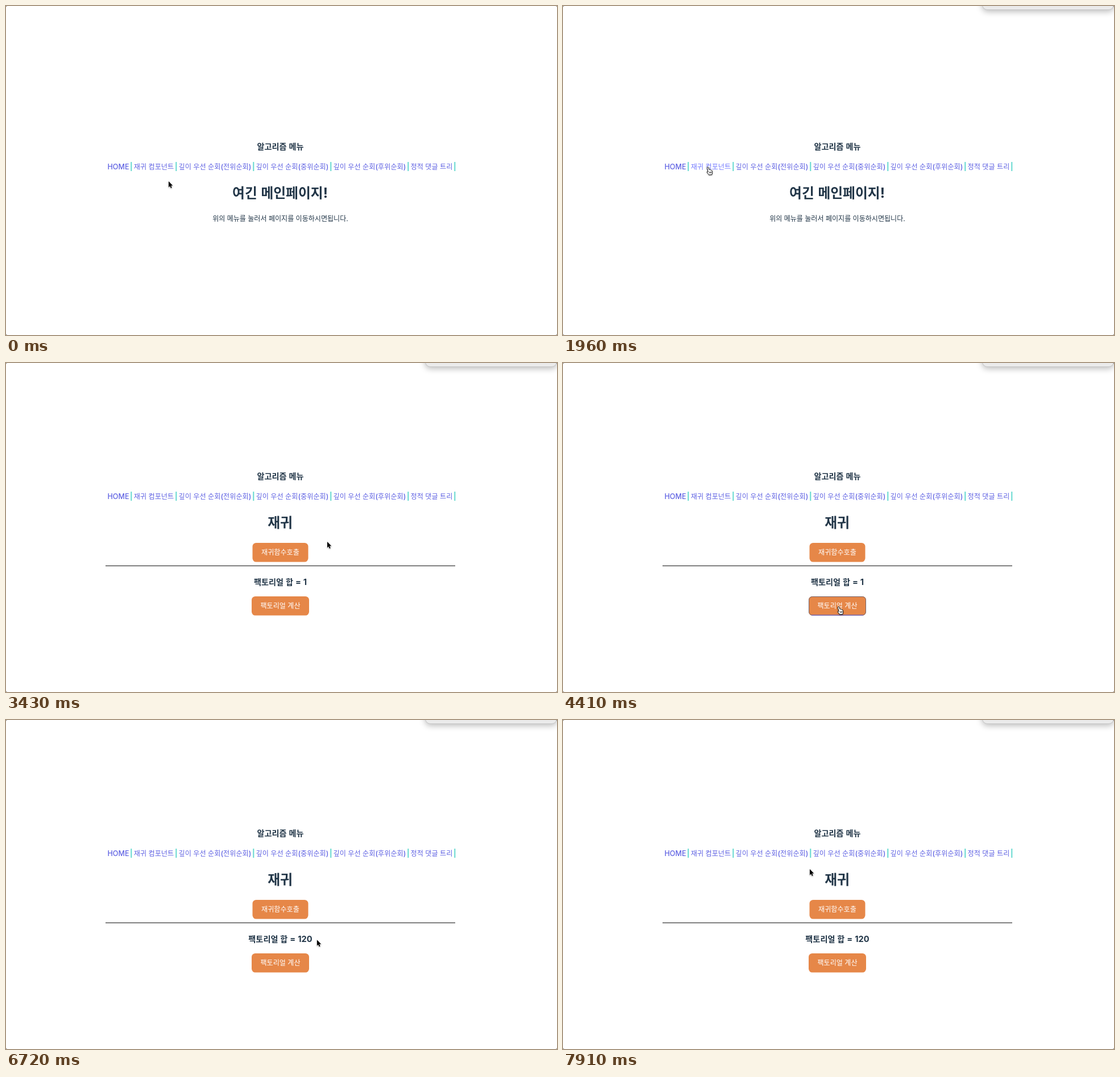
Recreate the animation shown at these times as an HTML page. Size 969 by 578 pixels, loop 8 s.

```html
<!DOCTYPE html>
<html lang="ko">
<head>
<meta charset="utf-8">
<title>알고리즘 메뉴</title>
<style>
  html, body { margin: 0; width: 100%; height: 100%; overflow: hidden; background: #fff; }
  svg { position: absolute; left: 0; top: 0; }
  text { font-family: Inter, 'Noto Sans CJK KR', sans-serif; text-anchor: middle; white-space: pre; }
  .ko { font-family: 'Noto Sans CJK KR', 'Noto Sans CJK JP', sans-serif; }
  #panel {
    position: absolute; left: 737px; top: -60px; width: 232px; height: 67px;
    box-sizing: border-box; background: #ebebeb; border: 1px solid #c6c6c6;
    border-radius: 9px; box-shadow: 0 3px 11px rgba(0, 0, 0, .27);
  }
  #pointer { filter: drop-shadow(0 1px 1px rgba(0, 0, 0, .3)); }
</style>
</head>
<body>
<div id="panel"></div>
<svg width="969" height="578" viewBox="0 0 969 578">
  <clipPath id="swept"><rect id="sweep" y="370" width="200" height="30"/></clipPath>
  <path d="M0 0h2L0 2zM969 0h-2l2 2zM0 578h2l-2-2zM969 578h-2l2-2z" fill="#999"/>
  <g id="header"></g>
  <g id="home"></g>
  <g id="recursion">
    <path d="M175 356.4H790" stroke="#3a3a3a" stroke-width="1.4"/>
    <path id="selection" d="M427 375H538.5V393H512V394.6H427Z" fill="#b2d7fd" clip-path="url(#swept)"/>
    <rect x="433.5" y="316" width="98" height="33.5" rx="6.4" fill="#e68748"/>
    <rect x="432" y="410" width="101" height="33.5" rx="6.4" fill="#e68748"/>
    <g id="ring" fill="none">
      <rect x="432.5" y="410.5" width="100" height="32.5" rx="6" stroke="#75646c"/>
      <path d="M437 443H528" stroke="#6f66dc" stroke-width="1.2"/>
    </g>
  </g>
  <g id="pointer">
    <path id="arrow" d="M0 0V10.4L2.3 8.2L3.9 12L5.7 11.2L4.1 7.5H7.3Z"
      stroke="#fff" stroke-width=".9" paint-order="stroke"/>
    <g id="hand" transform="translate(-3 -2)" stroke="#111" stroke-linejoin="round">
      <path fill="#fff" d="M2 1.2c.9-.6 1.8 0 2 .8l1 3.6c.5-.6 1.6-.5 1.8.3c.6-.4 1.5-.1 1.7.6c.8-.3 1.6.2 1.7 1l.5 2.8c.2 1.3-.3 2.1-.6 3l-.2 1.1-5.3.4-.5-1c-.9-1.1-2-2.1-2.9-3.6c-.4-.8.3-1.5 1.1-1.2l1 .7-1.8-6.5c-.2-.9 0-1.6.5-2z"/>
      <path fill="none" stroke-width=".8" d="M5.4 9.3l.5 2.8M7 9l.4 2.9M8.6 8.8l.3 2.8"/>
    </g>
    <path id="beam" d="M-2-7Q0-7 0-5V5Q0 7-2 7M2-7Q0-7 0-5M0 5Q0 7 2 7" fill="none" stroke="#222"/>
  </g>
</svg>
<script>
const LOOP = 8000, STEP = 70;
const OPEN = 2520, HOVER = 4130, RESULT = 4970, LEAVE = 6020, SELECT = 6860, CLEAR = 7350;
const INK = '#213547', LINK = '#5f62e3', LIT = '#747bff';
const $ = id => document.getElementById(id);

function add(parent, tag, attrs) {
  const el = document.createElementNS('http://www.w3.org/2000/svg', tag);
  for (const k in attrs) el.setAttribute(k, attrs[k]);
  return parent.appendChild(el);
}

// Latin runs are set slightly larger than Hangul ones.
function label(parent, str, x, y, size, weight, fill) {
  const text = add(parent, 'text', { x, y, fill, 'font-weight': weight });
  for (const run of str.match(/[가-힣 ]+|[^가-힣 ]+/g)) {
    const ko = /[가-힣 ]/.test(run);
    add(text, 'tspan', { 'font-size': ko ? size : size * 1.035, class: ko ? 'ko' : '' }).textContent = run;
  }
  return text;
}

const header = $('header'), home = $('home'), recursion = $('recursion');
const title = (parent, str, y) => label(parent, str, 482, y, 23.75, 700, INK);
const subtitle = (parent, str, y) => label(parent, str, 482.5, y, 14.15, 700, INK);
const caption = (str, y) => label(recursion, str, 482.5, y, 12.1, 500, '#fff');

subtitle(header, '알고리즘 메뉴', 252.3);
const orders = ['전위', '중위', '후위'].map(o => [`깊이 우선 순회(${o}순회)`, 127]);
let left = 179;
const links = [['HOME', 37], ['재귀 컴포넌트', 70], ...orders, ['정적 댓글 트리', 73]].map(([name, width]) => {
  const x = left + width / 2;
  add(header, 'rect', { x: left + width + 3.3, y: 274, width: 2, height: 16, fill: '#66d9d0' });
  left += width + 9;
  return { x, reach: width / 2, el: label(header, name, x, 286.6, 12.15, 500, LINK) };
});

title(home, '여긴 메인페이지!', 337);
label(home, '위의 메뉴를 눌러서 페이지를 이동하시면됩니다.', 482.5, 378, 12.05, 400, INK);

title(recursion, '재귀', 289.2);
caption('재귀함수호출', 337.4);
caption('팩토리얼 계산', 431.2);
const before = subtitle(recursion, '팩토리얼 합 = 1', 390.2);
const after = subtitle(recursion, '팩토리얼 합 = 120', 390.2);

// Pointer moves: start, end, x, y, sideways bow
const moves = [
  [0, 280, 218, 292], [280, 770, 580, 229], [840, 1720, 270, 292, 32],
  [1720, 1850, 233, 280], [1850, 1960, 255, 284],
  [3080, 3430, 565, 314], [3430, 4410, 485, 429, 40],
  [5950, 6020, 502, 394], [6020, 6790, 548, 386], [6790, 7070, 376, 373],
  [7140, 7210, 391, 386], [7490, 7910, 434, 262]
];
const clamp = v => Math.max(0, Math.min(1, v));
const ramp = (t, from, to) => clamp((t - from) / (to - from));
const ease = k => k * k * (3 - 2 * k);

function pointerAt(t) {
  let x = 286, y = 308;
  for (const [from, to, toX, toY, bow = 0] of moves) {
    if (t <= from) break;
    const k = ease(ramp(t, from, to));
    const dx = toX - x, dy = toY - y;
    const side = bow * Math.sin(Math.PI * k) / Math.hypot(dx, dy);
    x += dx * k + dy * side;
    y += dy * k - dx * side;
  }
  return [x, y];
}

const show = (el, on) => { el.style.display = on ? '' : 'none'; };
const near = (v, mid, reach) => Math.abs(v - mid) <= reach;

function draw(time) {
  const t = Math.floor(time % LOOP / STEP) * STEP;
  const opened = t >= OPEN;
  const shift = opened ? -48 : 0;
  const [x, y] = pointerAt(t);

  show(home, !opened);
  show(recursion, opened);
  show(before, t < RESULT);
  show(after, t >= RESULT);
  header.setAttribute('transform', `translate(0 ${shift})`);
  $('panel').style.transform = `translateX(${250 * (1 - ramp(t, 0, 560)) ** 3}px)`;

  let hand = opened && near(x, 482.5, 50) && near(y, 427, 17);
  for (const link of links) {
    const over = near(x, link.x, link.reach) && near(y, 282 + shift, 9);
    link.el.setAttribute('fill', over ? LIT : LINK);
    hand = hand || over;
  }
  const beam = opened && near(x, 482.5, 56) && near(y, 384.5, 9);
  $('pointer').setAttribute('transform', `translate(${x} ${y})`);
  show($('hand'), hand);
  show($('beam'), beam);
  show($('arrow'), !hand && !beam);

  $('ring').style.opacity = ramp(t, HOVER, HOVER + 210) - ramp(t, LEAVE, LEAVE + 210);
  show($('selection'), t >= SELECT && t < CLEAR);
  $('sweep').setAttribute('x', x);
}

const start = performance.now();
function tick() {
  draw(performance.now() - start);
  requestAnimationFrame(tick);
}
tick();
</script>
</body>
</html>
```
